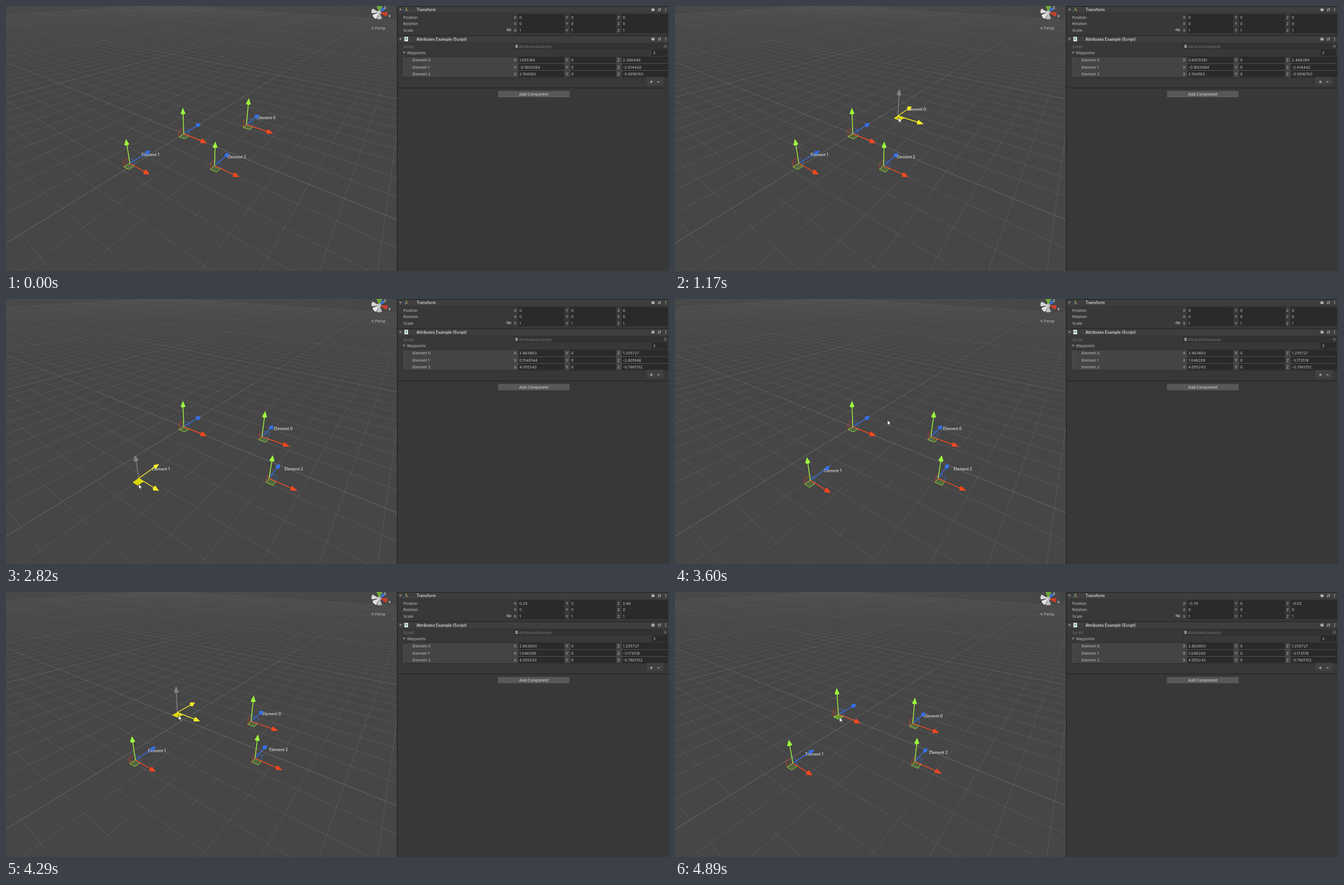
An HTML page with a canvas that plays this animation: 1184x473 px, repeating every 4.92 s.

```html
<!DOCTYPE html>
<html lang="en">
<head>
<meta charset="utf-8">
<title>Waypoint handles</title>
<style>
html, body { margin: 0; width: 100%; height: 100%; overflow: hidden; background: #383838; }
canvas { display: block; }
</style>
</head>
<body>
<canvas id="stage" width="1184" height="473"></canvas>
<script>
const W = 1184, H = 473, SPLIT = 698, LOOP = 4920, STEP = 30, HOLD = 90;
const RED = '#f8481f', GREEN = '#9ef73c', BLUE = '#3670ea', YELLOW = '#f4ee28', GREY = '#828282';
const INK = '#c2c2c2', EDGE = '#202020';
let g = document.getElementById('stage').getContext('2d');

// ---- camera: one projective column per world axis, centred on the origin
const CX = 317.5, CY = 228;
const AXES = [[33.45, 13.5, -0.05], [-1.4, -37.9, -0.0446], [28.5, -17.55, 0.0685]];
const mix = (row, v) => AXES.reduce((sum, axis, i) => sum + axis[row] * v[i], 0);
const depth = (...v) => 1 + mix(2, v);
const project = (...v) => [CX + mix(0, v) / depth(...v), CY + mix(1, v) / depth(...v)];

// ---- drags, in the order they happen; keys are [time, x, z]
const drags = [
  { id: 0, grab: [1, 3], from: 1020, to: 1560, reach: 570, via: [71, 397], keys: [
    [1020, 1.655184, 2.266448], [1080, 0.6970391, 2.486789], [1170, 0.589, 2.54],
    [1380, 3, 0.92], [1500, 2.863803, 1.255727]] },
  { id: 2, grab: [10, 8], from: 1890, to: 2280, reach: 1860, via: [430, 275], keys: [
    [1890, 2.194583, -0.9916763], [1980, 2.420378, -1.160685], [2040, 3.57, -1.086],
    [2200, 4.055243, -0.7861152]] },
  { id: 1, grab: [0, 10], from: 2610, to: 3150, reach: 2580, via: [350, 320], keys: [
    [2610, -0.1603084, -2.614442], [2790, 0.1549144, -2.801846], [2820, 0.918, -3.163],
    [3000, 1.046209, -3.173518]] },
  { id: 'root', grab: [2, 5], from: 3720, to: 4830, reach: 3690, via: [759, 105], keys: [
    [3720, 0, 0], [3800, -0.95, 0.2], [3870, -1.75, 3], [3930, -1.744, 3.107],
    [4230, 0.28, 0.66], [4290, -0.62, 0.303], [4770, -0.78, -0.02]] }
];
const root = drags[3];
const elements = drags.slice(0, 3).sort((a, b) => a.id - b.id);

// cubic through the keys, at rest on both ends
function sample(keys, t) {
  const last = keys.length - 1;
  t = Math.min(Math.max(t, keys[0][0]), keys[last][0]);
  let i = 0;
  while (i < last - 1 && t > keys[i + 1][0]) i++;
  const a = keys[i], b = keys[i + 1], span = b[0] - a[0], u = (t - a[0]) / span;
  const slope = (k, c) => k < 1 || k >= last ? 0
    : (keys[k + 1][c] - keys[k - 1][c]) / (keys[k + 1][0] - keys[k - 1][0]) * span;
  return [1, 2].map(c => {
    const p = a[c], d = b[c] - p, m = slope(i, c), r = slope(i + 1, c);
    return p + u * (m + u * (3 * d - 2 * m - r + u * (m + r - 2 * d)));
  });
}
function place(drag, t) {
  const [x, z] = sample(drag.keys, t);
  if (drag === root) return [x, z];
  const o = sample(root.keys, t);
  return [o[0] + x, o[1] + z];
}

// ---- drawing helpers
function box(x, y, w, h, fill, edge) {
  if (edge) {
    box(x, y, w, h, edge);
    x += .5; y += .5; w -= 1; h -= 1;
  }
  g.fillStyle = fill;
  g.fillRect(x, y, w, h);
}
function text(s, x, y, { bold, size = bold ? 6.9 : 6.8, align = 'left', color = INK } = {}) {
  g.font = `${bold ? 600 : 400} ${size}px Inter, sans-serif`;
  g.textAlign = align;
  g.textBaseline = 'middle';
  g.fillStyle = color;
  g.fillText(s, x, y + .6);
}
function poly(pts, fill, edge, lw = .8) {
  g.beginPath();
  pts.forEach(p => g.lineTo(p[0], p[1]));
  g.closePath();
  if (fill) { g.fillStyle = fill; g.fill(); }
  if (edge) { g.strokeStyle = edge; g.lineWidth = lw; g.stroke(); }
}
function line(p, q, color, lw = .8) {
  g.beginPath();
  g.moveTo(...p);
  g.lineTo(...q);
  g.strokeStyle = color;
  g.lineWidth = lw;
  g.stroke();
}
function oval(x, y, rx, ry, fill, edge, turn = 0) {
  g.beginPath();
  g.ellipse(x, y, rx, ry, turn, 0, 7);
  if (fill) { g.fillStyle = fill; g.fill(); }
  if (edge) { g.strokeStyle = edge; g.lineWidth = .8; g.stroke(); }
}
const dash = (x, y, half, color, lw) => line([x - half, y], [x + half, y], color, lw);
const post = (x, y, half, color, lw) => line([x, y - half], [x, y + half], color, lw);
const polar = (x, y, r, a) => [x + r * Math.cos(a), y + r * Math.sin(a)];

function layer(paint) {
  const c = document.createElement('canvas'), back = g;
  c.width = W; c.height = H;
  g = c.getContext('2d');
  paint();
  g = back;
  return c;
}

// ---- scene
function paintGrid() {
  const near = .06, far = 160;
  for (let k = -60; k <= 60; k++) {
    const color = `rgba(255,255,255,${k % 10 ? .13 : .25})`;
    const z0 = (near - depth(k, 0, 0)) / AXES[2][2], x1 = (near - depth(0, 0, k)) / AXES[0][2];
    if (z0 < far) line(project(k, 0, z0), project(k, 0, far), color);
    if (x1 > -far) line(project(-far, 0, k), project(x1, 0, k), color);
  }
  const fade = g.createLinearGradient(0, 0, 0, H / 2);
  fade.addColorStop(0, 'rgba(0,0,0,.2)');
  fade.addColorStop(1, '#000');
  g.globalCompositeOperation = 'destination-in';
  box(0, 0, W, H, fade);
}

function paintCompass() {
  const x = 666.5, y = 11.5;
  const arm = (deg, len, r, color) => {
    const a = deg * Math.PI / 180, end = polar(x, y, len, a);
    poly([[x, y], polar(...end, r, a + Math.PI / 2), polar(...end, r, a - Math.PI / 2)], color);
    oval(...end, r * .5, r, color, null, a);
  };
  arm(-42, 10, 3, '#3d6fd6');
  arm(-88, 11, 5, '#6ea83a');
  arm(14, 13, 4, '#c8402c');
  oval(x, y, 3.6, 3.6, '#b9b9b9');
  arm(192, 12, 4, '#d6d6d6');
  arm(138, 11, 4.4, '#e4e4e4');
  arm(88, 10, 4.4, '#bdbdbd');
  text('z', 675, 2.5, { bold: true, color: '#dcdcdc' });
  text('x', 683, 17, { bold: true, color: '#dcdcdc' });
  [-2, 2].forEach(d => line([652.5, 39.5], [657, 39.5 + d], INK));
  text('Persp', 659, 39.3);
}

function paintScene() {
  box(0, 0, SPLIT, H, '#464646');
  g.drawImage(layer(paintGrid), 0, 0);
  paintCompass();
}

// ---- inspector
const column = i => 915 + i * 92.4;
const topRow = i => 20 + i * 11.5;
const listRow = i => 96.5 + i * 12.4;

function vectorRow(y, label, x) {
  text(label, x, y);
  [...'XYZ'].forEach((axis, i) => {
    text(axis, column(i) - 8, y);
    box(column(i), y - 5.2, 82, 10.4, '#2a2a2a', EDGE);
  });
}
const fold = (x, y) => poly([[x - 2.4, y - 1.6], [x + 2.4, y - 1.6], [x, y + 2]], '#8e8e8e');

function header(y, label) {
  box(SPLIT, y - 6.5, W - SPLIT, 13, '#3e3e3e');
  box(SPLIT, y - 6.5, W - SPLIT, 1, EDGE);
  box(SPLIT, y + 6, W - SPLIT, .7, '#303030');
  fold(704.5, y);
  text(label, 733, y, { bold: true, color: '#d4d4d4' });
  oval(1155.5, y, 2.8, 2.8, INK);
  text('?', 1155.5, y - .4, { bold: true, size: 5, color: '#3e3e3e', align: 'center' });
  [-1, 1].forEach(d => {
    dash(1167, y + d * 1.4, 3, INK);
    post(1167 - d * 1.5, y + d * 1.4, 1.4, INK);
  });
  [-1, 0, 1].forEach(d => oval(1178, y + d * 2.3, .75, .75, INK));
}

function paintTransform() {
  header(6.5, 'Transform');
  ['#e0683a', '#4a86dd', '#8fd13f'].forEach((color, i) =>
    line([715, 7], polar(715, 7, 4.2, Math.PI * (1 + 4 * i) / 6), color, 1.3));
  ['Position', 'Rotation', 'Scale'].forEach((s, i) => vectorRow(topRow(i), s, 709.5));
  [896, 900].forEach(x => oval(x, 42.6, 2, 1.6, null, INK));
  line([895, 40], [901, 45], INK);
}

function paintScript() {
  const dim = '#777';
  header(59, 'Attributes Example (Script)');
  box(711.5, 55, 6.5, 8, '#e8ece8');
  text('#', 714.7, 58.6, { bold: true, size: 6, color: '#2f8f4e', align: 'center' });
  text('Script', 709.5, 72, { color: dim });
  box(907, 67, 275, 10, '#323232', '#2b2b2b');
  box(909.5, 69, 4.5, 6, '#8a8a8a');
  text('AttributesExample', 916, 72, { color: dim });
  oval(1177.5, 72, 2.4, 2.4, null, dim);
  oval(1177.5, 72, 1, 1, dim);
  fold(711, 83.3);
  text('Waypoints', 716, 83.3);
  box(1153, 78, 28, 10.5, '#2a2a2a', EDGE);
  text('3', 1155.5, 83.3);
  box(707.5, 90.5, 474, 37, '#444', '#242424');
  elements.forEach((e, i) => {
    [-1, 1].forEach(d => dash(713, listRow(i) + d, 2.5, '#525252'));
    vectorRow(listRow(i), 'Element ' + i, 726);
  });
  box(1144, 127, 30, 14.5, '#414141');
  dash(1152.5, 135.3, 2.5, INK, 1.1);
  post(1152.5, 135.3, 2.5, INK, 1.1);
  dash(1165.2, 135.3, 2, INK, 1.1);
  box(SPLIT, 145.8, W - SPLIT, 1, EDGE);
  box(878, 151, 129, 12.5, '#585858', '#303030');
  text('Add Component', 942.5, 157, { align: 'center', color: '#dedede' });
}

function paintInspector() {
  box(SPLIT, 0, W - SPLIT, H, '#383838');
  paintTransform();
  paintScript();
  box(SPLIT, 0, 1.2, H, EDGE);
}

// values refresh at a slower beat than the scene
function drawValues(t) {
  const seen = Math.floor((t - STEP) / HOLD) * HOLD;
  const row = (vals, y) => vals.forEach((v, i) => text(String(v), column(i) + 1.8, y));
  const [x, z] = sample(root.keys, seen).map(v => +v.toFixed(2) + 0);
  [[x, 0, z], [0, 0, 0], [1, 1, 1]].forEach((vals, i) => row(vals, topRow(i)));
  elements.forEach((e, i) => {
    const [ex, ez] = sample(e.keys, seen).map(v => +v.toPrecision(7));
    row([ex, 0, ez], listRow(i));
  });
}

// ---- handles
function arrow(at, axis, color) {
  const neck = .79, radius = .078, sides = 16;
  const put = (a, b, c) => {
    const v = [];
    [a, b, c].forEach((n, i) => v[(axis + i) % 3] = n);
    return at(...v);
  };
  const tip = put(1, 0, 0), mid = put(neck, 0, 0);
  const side = p => (p[0] - mid[0]) * (tip[1] - mid[1]) - (p[1] - mid[1]) * (tip[0] - mid[0]);
  const rim = Array.from({ length: sides }, (_, i) =>
    put(neck, ...polar(0, 0, radius, i * 2 * Math.PI / sides)));
  const sorted = [...rim].sort((p, q) => side(p) - side(q));
  line(at(0, 0, 0), mid, color, 1.4);
  poly(rim, color);
  poly([tip, sorted[0], sorted[sides - 1]], color);
}

function drawHandle(x, z, held, pointer) {
  const s = 1.163 * depth(x, 0, z), q = .25;
  const at = (i, j, k) => project(x + s * i, s * j, z + s * k);
  const quad = (u, v) => [[0, 0, 0], u, u.map((n, i) => n + v[i]), v].map(p => at(...p));
  const right = [q, 0, 0], up = [0, q, 0], front = [0, 0, -q];
  if (held) {
    arrow(at, 1, GREY);
    arrow(at, 2, YELLOW);
    arrow(at, 0, YELLOW);
    poly(quad(right, front), '#dcd500', YELLOW);
    return;
  }
  const c = at(q / 2, 0, -q / 2);
  const hover = pointer && Math.hypot(pointer[0] - c[0], pointer[1] - c[1]) < 10;
  arrow(at, 2, BLUE);
  poly(quad(front, up), 'rgba(248,72,31,.08)', 'rgba(225,60,32,.8)');
  poly(quad(right, up), 'rgba(54,112,234,.08)', 'rgba(54,112,234,.8)');
  poly(quad(right, front), `rgba(130,220,40,${hover ? .6 : .22})`, GREEN);
  arrow(at, 1, GREEN);
  arrow(at, 0, RED);
}

function drawLabel(name, x, z) {
  const w = depth(x, 0, z), [px, py] = project(x, 0, z), lean = .013;
  text(name, px + (18.3 + (px - CX) * lean) / (w - lean), py + (-13.3 + (py - CY) * lean) / (w - lean),
    { bold: true, color: '#cfcfcf' });
}

// ---- pointer: grips a handle, or glides on a curve to the next one
function grip(drag, t) {
  const [x, z] = place(drag, t), p = project(x, 0, z);
  return p.map((v, i) => v + drag.grab[i]);
}
function pointerAt(t) {
  if (t < 60) return null;
  const i = drags.findIndex(d => t < d.to);
  if (i < 0) return grip(root, t);
  const next = drags[i], prev = drags[i - 1];
  if (t >= next.from) return grip(next, t);
  const t0 = prev ? prev.to : 60;
  const p = prev ? grip(prev, t0) : [1176, 38], q = grip(next, next.from);
  const n = Math.min(1, (t - t0) / (next.reach - t0)), u = n * n * (3 - 2 * n);
  return p.map((v, k) => (1 - u) ** 2 * v + 2 * u * (1 - u) * next.via[k] + u * u * q[k]);
}
function drawPointer([x, y]) {
  const shape = [[0, 0], [0, 9], [2.1, 7.2], [3.6, 10.4], [5, 9.8], [3.5, 6.7], [6.4, 6.5]];
  poly(shape.map(p => [x + p[0], y + p[1]]), '#fff', '#222', .7);
}

const scene = layer(paintScene), inspector = layer(paintInspector);

function draw(now) {
  const t = Math.floor((now % LOOP) / STEP) * STEP, pointer = pointerAt(t);
  g.drawImage(scene, 0, 0);
  elements.forEach(e => drawLabel('Element ' + e.id, ...place(e, t)));
  [root, ...elements].forEach(d => drawHandle(...place(d, t), t >= d.from && t < d.to, pointer));
  g.drawImage(inspector, 0, 0);
  drawValues(t);
  if (pointer) drawPointer(pointer);
}

const start = performance.now();
function tick() {
  draw(performance.now() - start);
  requestAnimationFrame(tick);
}
tick();
</script>
</body>
</html>
```
